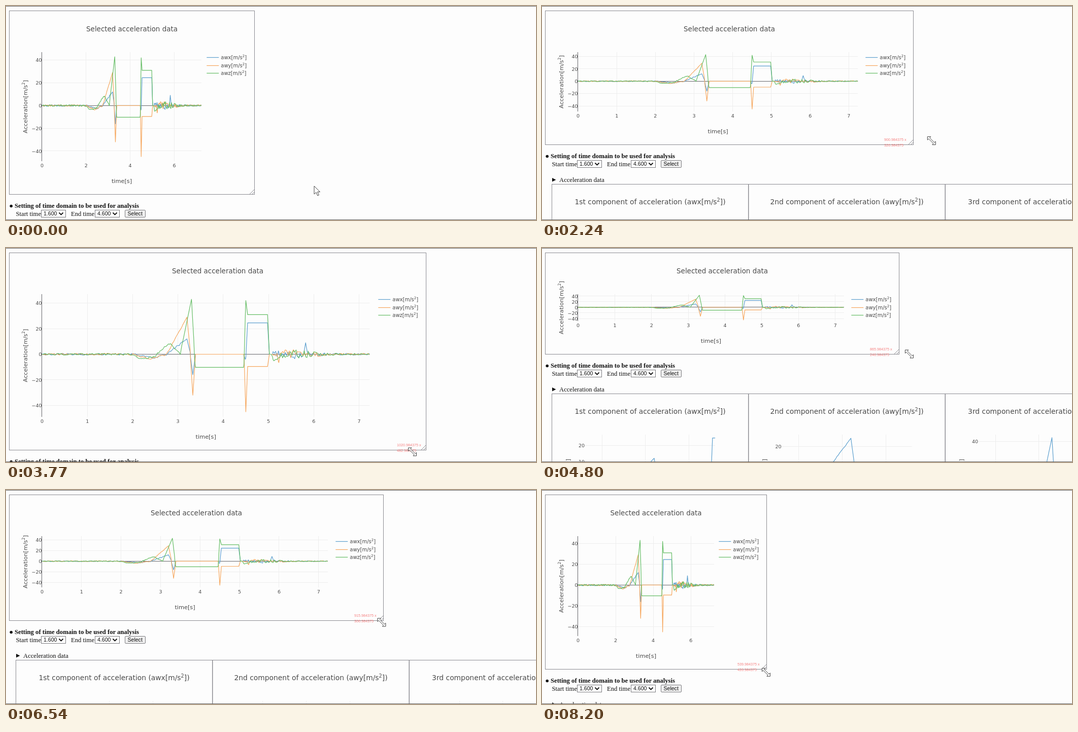
An HTML page for the animation above (8.25 s loop, 1044 by 422 pixels).

```html
<!DOCTYPE html>
<html lang="en">
<head>
<meta charset="utf-8">
<title>Resizable acceleration chart</title>
<style>
html, body { margin: 0; width: 100%; height: 100%; overflow: hidden; background: #fdfdfd; }
svg { display: block; width: 1044px; height: 422px; }
text { font-family: "DejaVu Sans", sans-serif; fill: #4a4a4a; white-space: pre; }
.serif { font: 12.65px "Liberation Serif", serif; fill: #101010; }
.ui { font: 10.55px "Liberation Sans", sans-serif; fill: #101010; }
.size { font: 7.2px "Liberation Sans", sans-serif; fill: #f58080; }
.bold { font-weight: bold; }
.frame { fill: none; stroke: #8c8c92; }
.grid { fill: none; stroke: #eeeeee; }
.axis { fill: none; stroke: #66666a; }
.data { fill: none; stroke-width: 1.2; stroke-linejoin: round; }
.ctl { fill: #fdfdfd; stroke: #7c7c80; }
.cursor { fill: #fff; stroke: #444; }
</style>
</head>
<body>
<svg viewBox="0 0 1044 422">
  <g id="chart"></g>
  <g id="below"></g>
  <path id="pointer" class="cursor" d="M0 0V16L4 12.5L6.8 19L9.4 17.8L6.6 11.6H11.5Z"/>
  <path id="sizer" class="cursor" d="M-8-8H-1.5L-3.6-5.6L5.6 3.6L8 1.5V8H1.5L3.6 5.6L-5.6-3.6L-8-1.5Z"/>
  <path d="M0 .5H1044M0 421.5H1044" stroke="#666"/>
</svg>
<script>
const LOOP = 8250, GRAB = 700, DRAG = 900;
const T_MAX = 7.235, V_MAX = 47, V_MIN = -49;
const LEFT = 71, TOP = 91;
const $ = id => document.getElementById(id);
const clamp = (v, lo, hi) => Math.min(hi, Math.max(lo, v));

// corner of the panel: time, right, bottom, velocity in px/ms
const path = [
  [DRAG, 490, 372, 0, 0],
  [1660, 536, 351, .17, -.08],
  [2830, 970, 245, .3, .09],
  [3770, 828, 399, -.34, 0],
  [4800, 704, 210, .24, -.05],
  [6540, 744, 258, -.05, 0],
  [8200, 443, 354, -.02, .03]
];

// straight rise to h, flat from a to b, straight fall
const slab = (t, a, b, h, rise = .04, fall = rise) =>
  h * clamp(Math.min((t - a) / rise, (b - t) / fall) + 1, 0, 1);
const peak = (t, at, h, rise = .04, fall = rise) => slab(t, at, at, h, rise, fall);

const series = [
  { name: 'awx', color: '#5c9fce', seed: 11, shape: t =>
    peak(t, 2.45, -3, .4, .35) + peak(t, 3.2, 12, .45, .08) + peak(t, 3.33, -16, .06) +
    peak(t, 4.49, -4) + slab(t, 4.54, 4.98, 24.5) + peak(t, 5.82, 6) },
  { name: 'awy', color: '#f6a75e', seed: 5, shape: t =>
    peak(t, 2.4, -3.5, .4, .35) + peak(t, 3.2, 29, .45, .08) + peak(t, 3.33, -32, .06) +
    peak(t, 4.5, -45) + slab(t, 4.54, 4.98, -9.6) + peak(t, 5.23, -6) },
  { name: 'awz', color: '#65bd65', seed: 23, shape: t =>
    peak(t, 2.2, -4, .25, .5) + peak(t, 2.83, 8.5, .35, .22) + peak(t, 3.3, 43, .25, .07) +
    slab(t, 3.39, 4.45, -10.3) + peak(t, 4.5, 42) + slab(t, 4.54, 4.98, 31) +
    peak(t, 5.12, -4, .06, .2) }
];

function random(seed) {
  return () => (seed = (seed * 16807) % 2147483647) / 2147483647;
}

// the sensor shakes a little, most of all after the landing
const shake = t => t > 3.1 && t < 5.1 ? 0 : .7 + 3.4 * Math.exp(-(((t - 5.55) / .5) ** 2));

function sample({ shape, seed }) {
  const rnd = random(seed * 7919), out = [];
  let from = 0, to = 0;
  for (let i = 0; i <= T_MAX * 100; i++) {
    if (i % 3 === 0) [from, to] = [to, rnd() * 2 - 1];
    const t = i / 100;
    out.push([t, shape(t) + shake(t) * (from + (to - from) * (i % 3) / 3)]);
  }
  return out;
}
series.forEach(s => { s.data = sample(s); });

const line = (data, x, y) =>
  'M' + data.map(([t, v]) => x(t).toFixed(1) + ' ' + y(v).toFixed(1)).join('L');
const draw = (cls, d, more = '') => `<path class="${cls}" d="${d}" ${more}/>`;
const text = (x, y, size, str, anchor = 'start', more = '') =>
  `<text x="${x}" y="${y}" font-size="${size}" text-anchor="${anchor}" ${more}>${str}</text>`;
const styled = (cls, x, y, str) => `<text class="${cls}" x="${x}" y="${y}">${str}</text>`;
const unit = size =>
  `[m/s<tspan dy="${-size * .38}" font-size="${size * .7}">2</tspan><tspan dy="${size * .38}">]</tspan>`;
const turned = (x, y, size, str) =>
  text(x, y, size, str, 'middle', `transform="rotate(-90 ${x} ${y})"`);
const label = v => String(v).replace('-', '\u2212');
const crisp = v => Math.floor(v) + .5;

// tick distance grows when the axis gets short
const xStep = width => T_MAX / (clamp(width / 80, 4, 9) + 1) > 1 ? 2 : 1;

function chart(R, B, dragging) {
  const right = (R - 97.3) / 1.02, bottom = B - 66;
  const x = t => LEFT + t / T_MAX * (right - LEFT);
  const y = v => TOP + (V_MAX - v) / (V_MAX - V_MIN) * (bottom - TOP);
  let s = `<rect class="frame" x="6.5" y="9.5" width="${R - 7}" height="${B - 10}"/>`;
  s += draw('frame', `M${R - 10} ${B - 1}L${R - 1} ${B - 10}M${R - 5} ${B - 1}L${R - 1} ${B - 5}`);
  s += text((R + 6) / 2, 49.5, 13.45, 'Selected acceleration data', 'middle');

  const step = xStep(right - LEFT);
  for (let t = 0; t < T_MAX; t += step) {
    if (t) s += draw('grid', `M${crisp(x(t))} ${TOP}V${bottom}`);
    s += text(x(t), B - 54.3, 9.5, t, 'middle');
  }
  for (let v = -40; v <= 40; v += 20) {
    if (v) s += draw('grid', `M${LEFT} ${crisp(y(v))}H${right}`);
    s += text(70.5, y(v) + 3.7, 9.5, label(v), 'end');
  }
  s += draw('axis', `M${LEFT - .5} ${TOP}V${bottom}M${LEFT} ${crisp(y(0))}H${right}`);

  const lx = right + .02 * (right - LEFT) + 4;
  series.forEach(({ name, color, data }, i) => {
    const ly = 101.5 + i * 15.6, stroke = `stroke="${color}"`;
    s += draw('data', line(data, x, y), stroke);
    s += draw('data', `M${lx} ${crisp(ly)}h24`, stroke);
    s += text(lx + 28, ly + 3.5, 10, name + unit(10));
  });
  s += text((LEFT + right) / 2, B - 23.2, 11.3, 'time[s]', 'middle');
  s += turned(41.5, (TOP + bottom) / 2, 11.3, 'Acceleration' + unit(11.3));

  if (dragging) {
    const px = (len, off) => Math.round(len * 1.25 - off) + .984375;
    s += styled('size', R - 58, B - 8.5, px(R - 6.5, 7) + ' x');
    s += styled('size', R - 58, B + 3.3, px(B - 9.5, 5));
  }
  return s;
}

function component(i, title, tick, tickY, gap, scale) {
  const dx = i * 387.5, top = 158, bottom = 312;
  const x = t => 118 + dx + (t - 2) * 85.8;
  const y = v => tickY + (tick - v) * scale;
  const { name, data } = series[i];
  let s = `<rect class="frame" x="${19.5 + dx}" y="77.5" width="387" height="300"/>`;
  s += text(213 + dx, 117.4, 13.85, `${title} component of acceleration (${name}${unit(13.85)})`, 'middle');
  for (let t = 2; t < 5; t++) s += draw('grid', `M${crisp(x(t))} ${top}V${bottom}`);
  for (let v = tick; y(v) < bottom; v -= gap) {
    s += draw(v ? 'grid' : 'axis', `M${x(1.6)} ${crisp(y(v))}H${x(4.6)}`);
    s += text(84 + dx, y(v) + 3.5, 9.5, label(v), 'end');
  }
  s += draw('data', line(data.filter(([t]) => t >= 1.6 && t <= 4.6), x, y), 'stroke="#5c9fce"');
  return s + turned(54.5 + dx, 234, 11.1, name + unit(11.1));
}

function picker(x, value) {
  return `<rect class="ctl" x="${x}" y="30.5" width="48" height="14"/>` +
    styled('ui', x + 4.5, 41.3, value) +
    `<path d="M${x + 35} 35.5l4 4l4-4" fill="none" stroke="#101010" stroke-width="1.8"/>`;
}

// everything under the panel, measured from its bottom edge
$('below').innerHTML =
  '<circle cx="10.2" cy="22.5" r="2.8" fill="#101010"/>' +
  styled('serif bold', 17, 26.3, 'Setting of time domain to be used for analysis') +
  styled('serif', 19.5, 42.3, 'Start time') + picker(69.5, '1.600') +
  styled('serif', 128, 42.3, 'End time') + picker(175.5, '4.600') +
  '<rect class="ctl" x="234.5" y="30.5" width="40" height="14" rx="1.5" style="fill:#efefef"/>' +
  styled('ui', 239.5, 41.3, 'Select') +
  '<path d="M20 65l7.5 3.7l-7.5 3.7z" fill="#101010"/>' +
  styled('serif', 34, 73, 'Acceleration data') +
  component(0, '1st', 20, 179, 10, 3.2) +
  component(1, '2nd', 20, 181, 20, 1.76) +
  component(2, '3rd', 40, 171, 20, 2.35);

// cubic curve through a, b with end velocities; gives place and velocity
function curve(a, b, va, vb, u, d) {
  const place = (1 + 2 * u) * (1 - u) ** 2 * a + u * (1 - u) ** 2 * d * va +
    u * u * (3 - 2 * u) * b + u * u * (u - 1) * d * vb;
  const speed = 6 * u * (1 - u) * (b - a) / d + (1 - u) * (1 - 3 * u) * va + u * (3 * u - 2) * vb;
  return [place, speed];
}

function corner(time) {
  const t = clamp(time, DRAG, 8200);
  const i = Math.max(1, path.findIndex(p => t <= p[0]));
  const [t0, r0, b0, vr0, vb0] = path[i - 1], [t1, r1, b1, vr1, vb1] = path[i];
  const d = t1 - t0, u = (t - t0) / d;
  return [curve(r0, r1, vr0, vr1, u, d), curve(b0, b1, vb0, vb1, u, d)];
}

function place(el, x, y, on) {
  el.setAttribute('transform', `translate(${x.toFixed(1)} ${y.toFixed(1)})`);
  el.setAttribute('visibility', on ? 'visible' : 'hidden');
}

function render(time) {
  const [[r, vx], [b, vy]] = corner(time);
  const R = Math.round(r), B = Math.round(b);
  $('chart').innerHTML = chart(R, B, time >= DRAG);
  $('below').setAttribute('transform', `translate(0 ${B})`);
  // the mouse leads the panel by a short lag
  const u = clamp((time - 50) / (GRAB - 50), 0, 1), e = u * u * (3 - 2 * u);
  place($('pointer'), 607 - 117 * e, 355 + 18 * e, time < GRAB);
  place($('sizer'), r + vx * 80, b + 3 + vy * 80, time >= GRAB);
}

const start = performance.now();
function tick() {
  render((performance.now() - start) % LOOP);
  requestAnimationFrame(tick);
}
tick();
</script>
</body>
</html>
```
